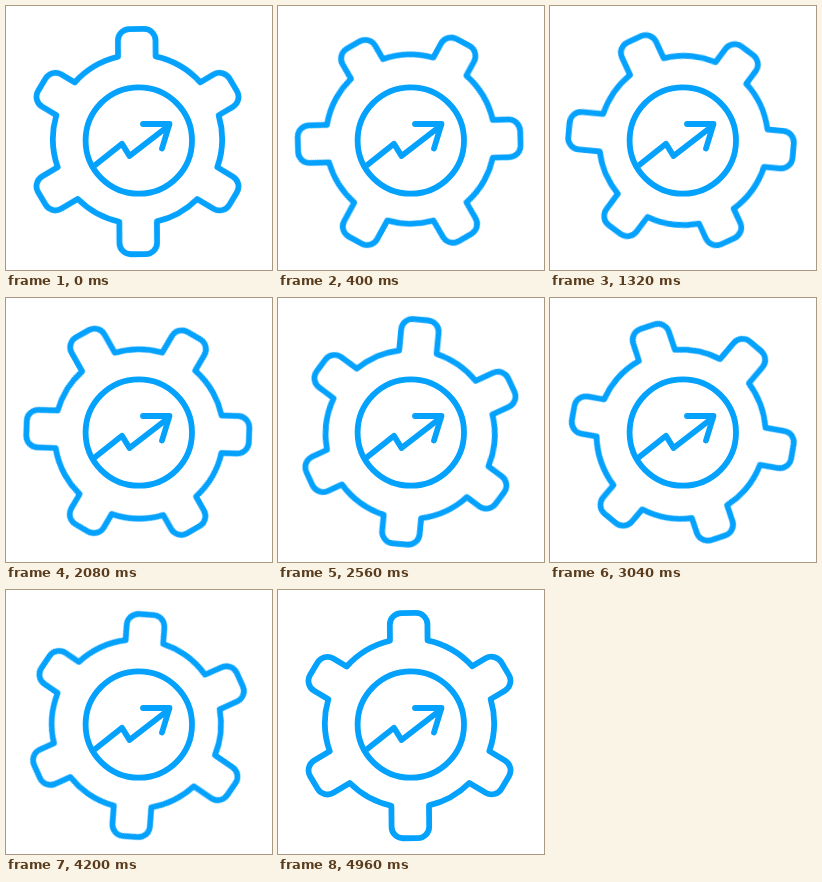
An HTML page for the animation above (5000 ms loop, 266x264 px).

```html
<!DOCTYPE html>
<html lang="en">
<head>
<meta charset="utf-8">
<title>Growth gear</title>
<style>
  html, body { margin: 0; width: 100%; height: 100%; overflow: hidden; background: #fff; }
  svg { display: block; width: 266px; height: 264px; }
  path, circle {
    fill: none;
    stroke: #04a1fd;
    stroke-width: 5.8;
    stroke-linecap: round;
    stroke-linejoin: round;
  }
  #gear {
    transform-origin: 131.9px 134.7px;
    animation: turn 5s linear infinite;
  }
  @keyframes turn {
    from { transform: rotate(0deg); }
    99.2%, to { transform: rotate(360deg); }
  }
</style>
</head>
<body>
<svg viewBox="0 0 266 264">
  <path id="gear"/>
  <circle cx="132.8" cy="134.5" r="53.2"/>
  <path d="M88 160 L116 137.8 L123.5 150 L163 119.5 M137 118 H163.5 L156 142.5"/>
</svg>
<script>
  // The rim sits slightly above the middle of the teeth
  const teeth = { x: 131.5, y: 135.6, half: 18.8, corner: 11.5 };
  const rim = { x: 131.5, y: 133.1, r: 84.6 };
  const longTip = 112.6, shortTip = 111.3;
  const layout = [
    [-90.5, longTip], [-30.8, shortTip], [30.7, shortTip],
    [89.5, longTip], [149.2, shortTip], [210.7, shortTip]
  ];

  function tooth([deg, tip], i) {
    const { half, corner } = teeth;
    const a = deg * Math.PI / 180, c = Math.cos(a), s = Math.sin(a);
    const dx = rim.x - teeth.x, dy = rim.y - teeth.y;

    // Point at a distance along the tooth's axis and an offset across it
    const p = (along, across) =>
      (teeth.x + along * c - across * s).toFixed(2) + ' ' +
      (teeth.y + along * s + across * c).toFixed(2);
    // Where a side of the tooth meets the rim
    const root = across =>
      p(dx * c + dy * s + Math.sqrt(rim.r ** 2 - (across + dx * s - dy * c) ** 2), across);
    const round = `A${corner} ${corner} 0 0 1 `;

    return (i ? `A${rim.r} ${rim.r} 0 0 1 ` : 'M') + root(-half) +
      'L' + p(tip - corner, -half) + round + p(tip, corner - half) +
      'L' + p(tip, half - corner) + round + p(tip - corner, half) +
      'L' + root(half);
  }

  const outline = layout.map(tooth).join('');
  const start = outline.slice(1, outline.indexOf('L'));
  document.getElementById('gear').setAttribute('d',
    `${outline}A${rim.r} ${rim.r} 0 0 1 ${start}Z`);
</script>
</body>
</html>
```
